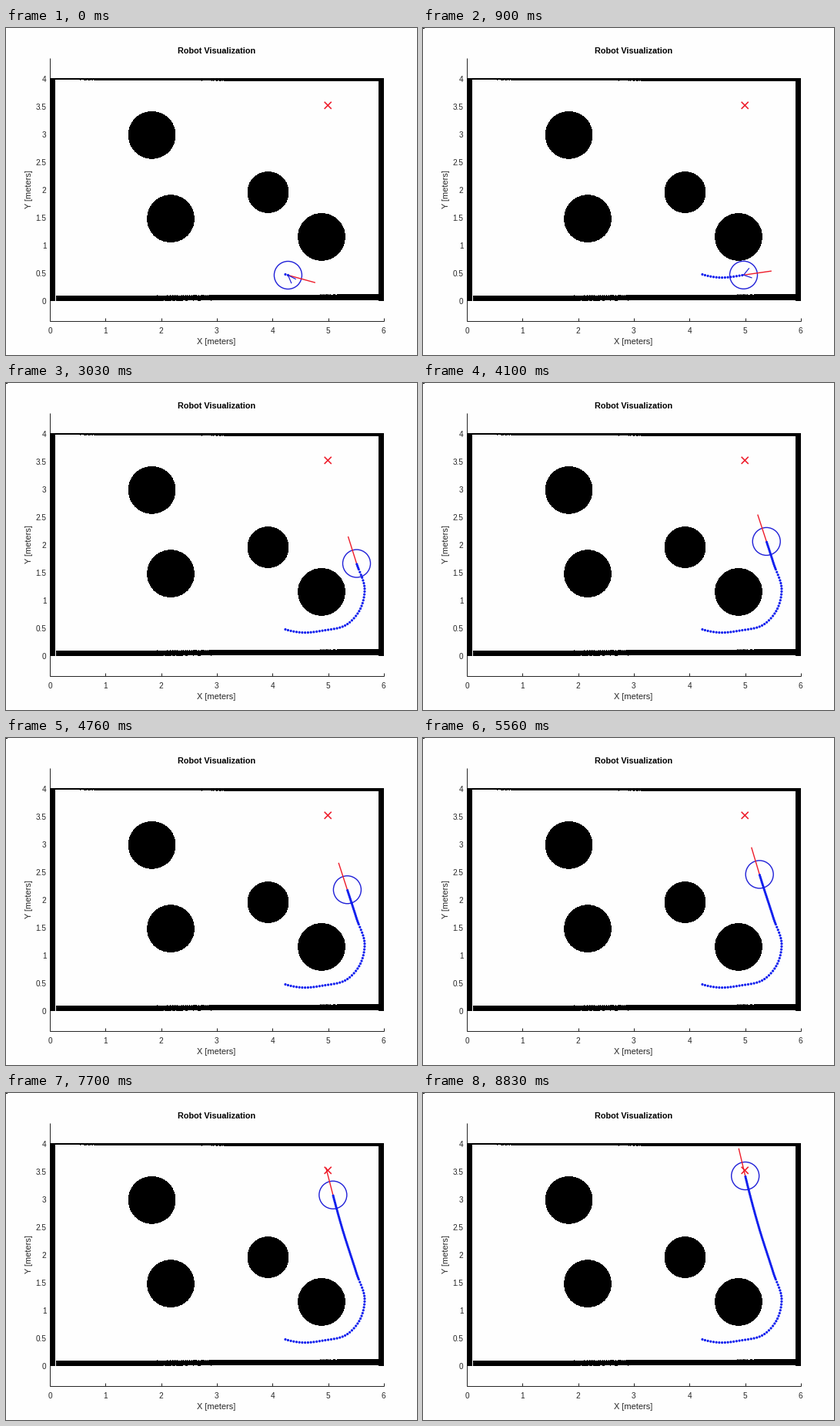
A matplotlib script that plays this animation: 534 px wide and 424 px high, repeating every 9130 ms.

```python
import numpy as np
import matplotlib.pyplot as plt
from matplotlib.animation import FuncAnimation
from matplotlib.patches import Circle, Rectangle

W, H, DPI = 534, 424, 100
LOOP, STEP = 9130, 22
TICK = 1000 / 15  # ms between robot updates
BG, INK = "#fefefe", "#262626"
BLUE, RED = "#2020d8", "#ee1c2a"
PT = 72 / DPI  # points per pixel

plt.rcParams["font.family"] = "Liberation Sans"
fig = plt.figure(figsize=(W / DPI, H / DPI), dpi=DPI, facecolor=BG)
ax = fig.add_axes([0, 0, 1, 1])
ax.set(xlim=(0, W), ylim=(H, 0))
ax.axis("off")
rng = np.random.default_rng(4)


def px(x):
    return 57 + 72.3 * x


def py(y):
    return 354.3 - 72.1 * y


def line(x, y, color, width, **kw):
    return ax.plot(x, y, color=color, lw=width * PT, **kw)[0]


def label(x, y, s, size=10, **kw):
    opts = dict(ha="center", va="center_baseline", color=INK, fontsize=size * PT)
    ax.text(x, y, s, **{**opts, **kw})


def block(x0, x1, y0, y1):
    return ax.add_patch(Rectangle((x0, y0), x1 - x0, y1 - y0, fc="black", lw=0, aa=False, zorder=2))


def ragged(y, empty, full, end):
    """One pixel row that turns from empty to solid black, then runs to end."""
    x = np.arange(min(empty, full), max(empty, full))
    x = x[rng.random(len(x)) < (x - empty) / (full - empty)]
    ax.plot(x + 0.5, np.full(len(x), y + 0.5), ",", color="black", zorder=3)
    block(min(full, end), max(full, end), y, y + 1)


# Axes
line([57, 57], [39, 380], INK, 1, solid_capstyle="butt")
line([57, 491], [380, 380], INK, 1, solid_capstyle="butt")
for k in range(7):
    line([px(k)] * 2, [376, 380], INK, 1, solid_capstyle="butt")
    label(px(k), 391.5, str(k))
for k in range(9):
    label(52.5, py(k / 2), f"{k / 2:g}", ha="right")
label(273, 406.5, "X [meters]", 11)
label(30, 209.5, "Y [meters]", 11, rotation=90, va="center")
label(273.5, 29, "Robot Visualization", 10.9, weight="bold", color="black")

# Map: slightly tilted walls with ragged steps, and round obstacles
block(57, 64, 65, 354)
block(484, 491, 65, 354)
block(57, 491, 65, 67)
ragged(67, 77, 125, 491)
ragged(68, 250, 299, 491)
block(65, 491, 347, 353)
ragged(346, 176, 275, 491)
ragged(345, 393, 436, 491)
ragged(353, 275, 205, 65)
for x, y, r in [(189.6, 138.8, 30.3), (214, 247.2, 30.3), (340.5, 213, 26.4), (410, 270.9, 30.3)]:
    ax.add_patch(Circle((x, y), r, fc="black", lw=0, aa=False, zorder=2))

# Goal
for d in (-4, 4):
    line([414.2, 422.2], [100.3 - d, 100.3 + d], RED, 1.6, zorder=8)

# Driven path: a smooth curve through a few way points
way = np.array([(363, 319.5), (384, 323.5), (412, 321), (443, 313), (459, 295.5),
                (466, 268), (455.5, 234), (436.5, 174.5), (418.7, 107.5)])
dist = np.r_[0, np.cumsum(np.hypot(*np.diff(way, axis=0).T))]
slope = np.gradient(way, dist, axis=0, edge_order=2)


def at(s):
    """Hermite curve at distance s."""
    s = np.atleast_1d(s)
    i = np.clip(np.searchsorted(dist, s, side="right") - 1, 0, len(way) - 2)
    h = (dist[i + 1] - dist[i])[:, None]
    u = (s - dist[i])[:, None] / h
    return ((1 + 2 * u) * (1 - u) ** 2 * way[i] + u * (1 - u) ** 2 * h * slope[i]
            + u * u * (3 - 2 * u) * way[i + 1] + u * u * (u - 1) * h * slope[i + 1])


def heading(s):
    a, b = at([max(s - 0.5, 0), min(s + 0.5, dist[-1])])
    return np.arctan2(b[1] - a[1], b[0] - a[0])


# Timing: quick round the obstacle, slower afterwards, with short stalls
TURN, DONE = 1830, 6830
SLOW = 2800
STALL = 200
stalls = np.array([3760, 4100, 4560, 4760, 5560, 6630, 6960, 7360, 8300, 8560])


def drive_time(t):
    t = max(0, 30 + TICK * np.floor((t - 30) / TICK))
    return t - np.clip(t - stalls, 0, STALL).sum()


def travel(d):
    return np.interp(d, [0, SLOW, DONE], [3.5, dist[6] - 8, dist[-1]])


# The robot leaves one dot per update
dot_s = np.r_[0, travel(np.arange(0, DONE, TICK))]
dot_area = (3.2 * PT) ** 2
trail = ax.scatter(*at(dot_s).T, s=np.full(len(dot_s), dot_area), c="#0f1eee", lw=0, zorder=6)
ring = ax.add_patch(Circle((0, 0), 18, fill=False, ec=BLUE, lw=1.4 * PT, zorder=5))
beam = line([], [], RED, 1.4, zorder=5)
arrow = line([], [], BLUE, 1.2, zorder=6)
corner = block(0, 2, 0, 1)


def draw(i):
    t = (i + 1) * STEP - 1
    d = drive_time(t)
    s = travel(d)
    x, y = at(s)[0]
    a = heading(s)

    ring.center = x, y
    beam.set_data([x, x + 36 * np.cos(a)], [y, y + 36 * np.sin(a)])
    trail.set_sizes(np.where(dot_s <= s + 0.1, dot_area, 0))

    # Arrow head swings round during the turn, then shrinks away
    u = min(d / TURN, 1)
    size = 11 * np.clip((SLOW - d) / (SLOW - TURN), 0, 1)
    arms = np.radians(47 - 129 * u + (20 + 30 * u) * np.array([-1, 1]))
    ex, ey = x + size * np.cos(arms), y + size * np.sin(arms)
    arrow.set_data([ex[0], x, ex[1]], [ey[0], y, ey[1]])
    arrow.set_visible(size > 0)
    corner.set_visible(t >= 30)
    return trail, ring, beam, arrow, corner


anim = FuncAnimation(fig, draw, frames=LOOP // STEP, interval=STEP, repeat=True, repeat_delay=0)
plt.show()
```
